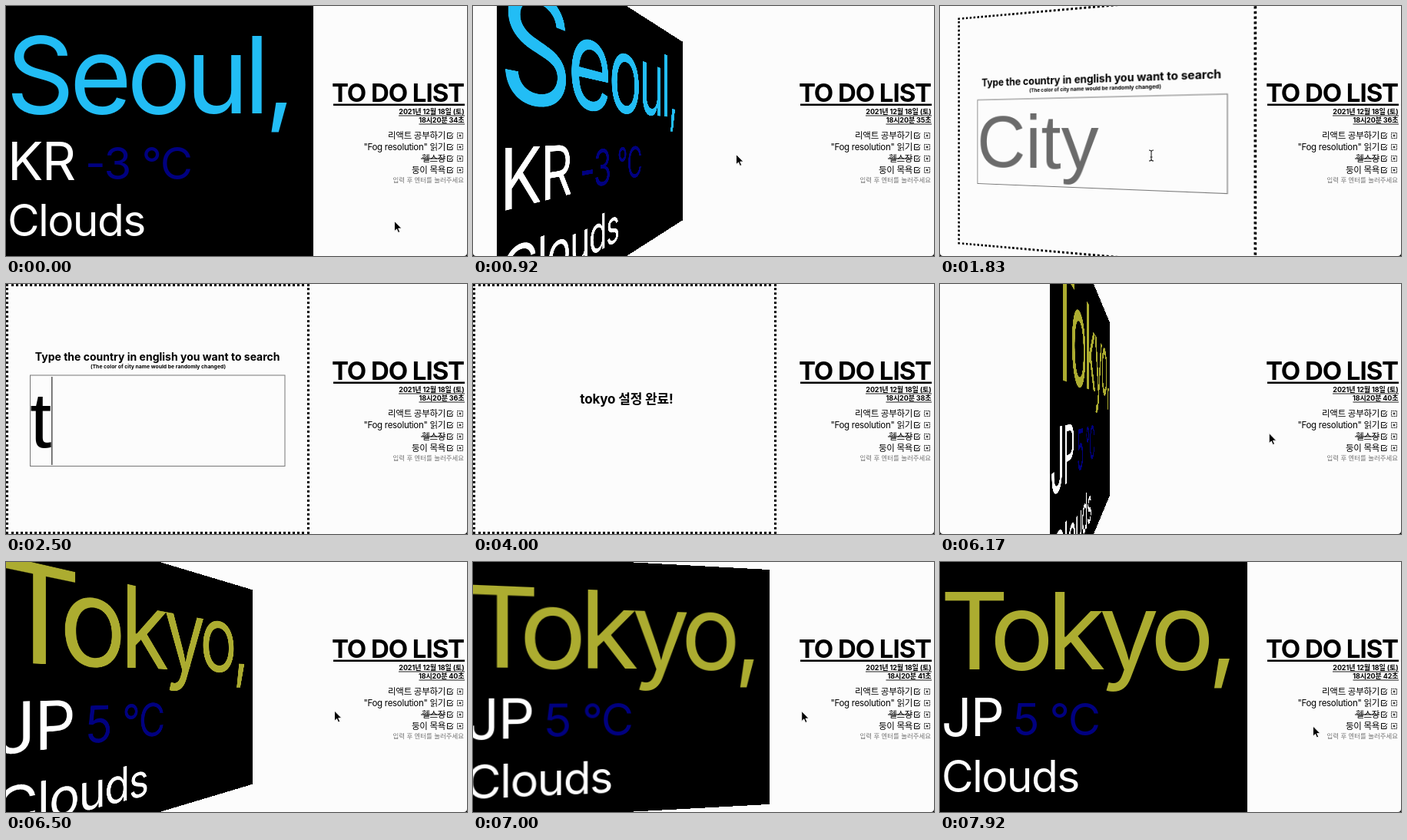
An HTML page for the animation above (8000 ms loop, 600 by 326 pixels).

```html
<!DOCTYPE html>
<html lang="ko">
<head>
<meta charset="utf-8">
<title>Weather card and to-do list</title>
<style>
  html, body { margin: 0; width: 100%; height: 100%; overflow: hidden; background: #fcfcfc; }
  body { position: relative; font-family: Inter, "Noto Sans CJK KR", "Noto Sans CJK JP", sans-serif; }
  svg { position: absolute; left: 0; top: 0; display: block; }
  text { white-space: pre; }
  .face { position: absolute; left: 0; top: 0; height: 326px; box-sizing: border-box; overflow: hidden; }
  #front { width: 400px; background: #000; }
  #back { width: 395px; border: 3px dotted #000; }
  #back svg { left: -3px; top: -3px; }
  #front text { fill: #fff; }
  #city { font-size: 139px; }
  #country { font-size: 69px; letter-spacing: -.025em; }
  #front #temp { font-size: 58px; letter-spacing: -.027em; fill: #000080; }
  #sky { font-size: 57px; letter-spacing: -.028em; }
  .bold { font-weight: 700; }
  .mid { text-anchor: middle; }
  .end { text-anchor: end; }
  .field { font: 102px "Liberation Sans", Arial, sans-serif; }
  .item { font-size: 11.5px; letter-spacing: -.3px; }
</style>
</head>
<body>
<div id="front" class="face">
  <svg width="400" height="326">
    <text id="city" x="0" y="139.5"></text>
    <text id="country" x="2" y="227"></text>
    <text id="temp" y="226"></text>
    <text id="sky" x="2" y="300">Clouds</text>
  </svg>
</div>
<div id="back" class="face">
  <svg width="395" height="326">
    <g id="form">
      <text class="bold mid" x="197.2" y="100" font-size="14">Type the country in english you want to search</text>
      <text class="bold mid" x="198" y="110" font-size="6.85">(The color of city name would be randomly changed)</text>
      <rect x="31.5" y="119" width="331.5" height="118.5" fill="none" stroke="#777"/>
      <text id="hint" class="field" x="31" y="213" fill="#6b6b6b">City</text>
      <text id="typed" class="field" x="31" y="213"></text>
      <rect id="caret" y="121" width="1" height="115"/>
    </g>
    <text id="done" class="bold mid" x="200" y="156" font-size="17" letter-spacing="-.15">tokyo 설정 완료!</text>
  </svg>
</div>
<svg width="600" height="326">
  <text class="bold end" x="596" y="125.4" font-size="33" letter-spacing="-1.05">TO DO LIST</text>
  <path d="M426 128.8H597" stroke="#000" stroke-width="2.6"/>
  <g class="bold end" font-size="9" letter-spacing="-.1">
    <text x="596.5" y="141">2021년 12월 18일 (토)</text>
    <text id="clock" x="596.5" y="152"></text>
  </g>
  <path d="M511 143H597M537.5 154H597" stroke="#000" stroke-width=".9"/>
  <g id="list"></g>
  <path d="M540 199H572" stroke="#000"/>
  <text class="end" x="596" y="230" font-size="8.45" fill="#757575">입력 후 엔터를 눌러주세요</text>
  <path d="M0 322Q0 326 4 326H0ZM600 322Q600 326 596 326H600Z"/>
  <path id="arrow" d="M0 0V13.2L3 10.4L5 15L7.2 14L5.2 9.6H9.4Z" stroke="#fff" stroke-width=".9"/>
  <path id="beam" d="M-3 -7Q0 -7 0 -5Q0 -7 3 -7M0 -5V5M-3 7Q0 7 0 5Q0 7 3 7M-1.5 2H1.5" fill="none" stroke="#222" stroke-width="1.1"/>
</svg>
<script>
  const $ = id => document.getElementById(id);
  const LOOP = 8000, FLIP = 2000, ENTER = 489, LEAVE = 5532;
  const SUBMIT = 3830, RESET = 5080;
  const WORD = 'tokyo', KEYS = [2500, 2830, 3000, 3330, 3420];

  const SEOUL = { city: 'Seoul,', country: 'KR', temp: '-3 °C', x: 103, color: '#22bdf5', track: '-.047em', kern: '0' };
  const TOKYO = { city: 'Tokyo,', country: 'JP', temp: '5 °C', x: 95, color: '#acac30', track: '-.0625em', kern: '0 -5.5' };

  // time, x, y of the pointer
  const MOUSE = [
    [0, 505.5, 280.5], [80, 503, 279], [486, 399, 222], [800, 344, 194], [920, 342.5, 193.5],
    [1500, 276, 195], [1830, 275, 195], [4200, 275, 195], [4900, 192, 148], [5170, 192, 149],
    [5538, 400, 190], [5670, 429.5, 195.5], [6500, 427.5, 194], [7580, 428, 195],
    [7670, 436, 198], [7920, 485.5, 214], [8000, 492, 217]
  ];

  const items = ['리액트 공부하기', '"Fog resolution" 읽기', '헬스장', '둥이 목욕'];
  $('list').innerHTML = items.map((label, i) => {
    const y = 169 + i * 15;
    return `<text class="item end" x="572" y="${y + 4}">${label}</text>
      <g transform="translate(574 ${y - 4})" fill="none" stroke="#000">
        <path d="M7 4V7.5H.5V.5H6"/><path d="M2 3.5L3.8 5.4L8 .8"/>
        <rect x="13.5" y=".5" width="7" height="7" stroke-dasharray="1.4 .9"/>
        <path d="M15.5 4H18.5M17 2.5V5.5"/>
      </g>`;
  }).join('');

  // cubic-bezier(.25, .1, .25, 1)
  function ease(p) {
    if (p <= 0) return 0;
    if (p >= 1) return 1;
    const curve = (a, b, u) => 3 * a * u * (1 - u) ** 2 + 3 * b * u * u * (1 - u) + u ** 3;
    let lo = 0, hi = 1;
    for (let i = 0; i < 24; i++) {
      const u = (lo + hi) / 2;
      if (curve(.25, .25, u) < p) lo = u; else hi = u;
    }
    return curve(.1, 1, lo);
  }

  function pointer(t) {
    const i = Math.max(1, MOUSE.findIndex(k => k[0] > t));
    const [t0, x0, y0] = MOUSE[i - 1], [t1, x1, y1] = MOUSE[i];
    const p = (t - t0) / (t1 - t0);
    return [x0 + (x1 - x0) * p, y0 + (y1 - y0) * p];
  }

  const show = (id, on) => { $(id).style.display = on ? '' : 'none'; };
  const turn = (id, deg) => { $(id).style.transform = `perspective(432px) rotateY(${deg}deg)`; };

  function drawFront(place) {
    for (const key of ['city', 'country', 'temp']) $(key).textContent = place[key];
    $('temp').setAttribute('x', place.x);
    $('city').setAttribute('dx', place.kern);
    $('city').style.fill = place.color;
    $('city').style.letterSpacing = place.track;
  }

  function drawForm(t) {
    const sent = t >= SUBMIT && t < RESET;
    show('form', !sent);
    show('done', sent);
    const count = t < SUBMIT ? KEYS.filter(k => t >= k).length : 0;
    $('typed').textContent = WORD.slice(0, count);
    show('hint', !count);
    show('caret', count);
    if (count) $('caret').setAttribute('x', 31 + $('typed').getComputedTextLength());
  }

  function drawPointer(t, angle) {
    const [x, y] = pointer(t);
    const hidden = t >= 2500 && t < 4200;
    const overField = angle > 90 && x < 365 && (t < SUBMIT || t >= RESET);
    show('arrow', !hidden && !overField);
    show('beam', !hidden && overField);
    for (const id of ['arrow', 'beam']) $(id).setAttribute('transform', `translate(${x} ${y})`);
  }

  function draw(t) {
    const angle = 180 * (ease((t - ENTER) / FLIP) - ease((t - LEAVE) / FLIP));
    show('front', angle < 90);
    show('back', angle >= 90);
    turn('front', angle);
    turn('back', angle - 180);
    drawFront(t < SUBMIT ? SEOUL : TOKYO);
    drawForm(t);
    drawPointer(t, angle);
    $('clock').textContent = `18시20분 ${34 + Math.floor((t + 175) / 1000)}초`;
  }

  let start;
  function tick(now) {
    start ??= now;
    draw((now - start) % LOOP);
    requestAnimationFrame(tick);
  }
  draw(0);
  requestAnimationFrame(tick);
</script>
</body>
</html>
```
